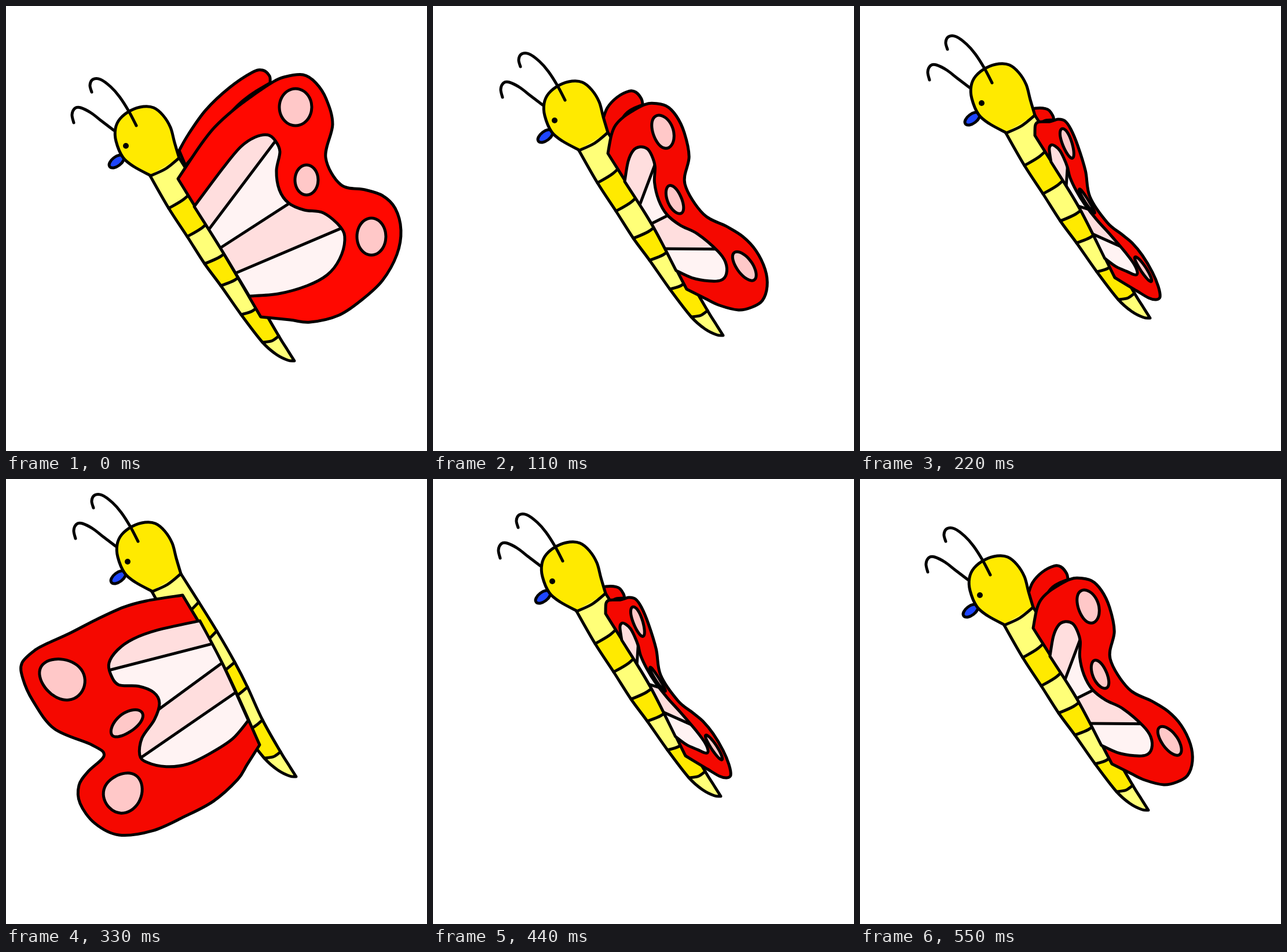
Write an HTML page with a canvas that moves like this. It is 727x770 px and loops after 0.66 s.

```html
<!DOCTYPE html>
<html lang="en">
<head>
<meta charset="utf-8">
<title>Butterfly</title>
<style>
  html, body { margin: 0; width: 100%; height: 100%; overflow: hidden; background: #fff; }
  canvas { display: block; }
</style>
</head>
<body>
<canvas id="stage" width="727" height="770"></canvas>
<script>
const ctx = document.getElementById('stage').getContext('2d');
const YELLOW = '#ffea00', LEMON = '#ffff78', PINK = '#ffdede', PALE = '#fff3f3', ROSE = '#ffc8c8', BLUE = '#1e46ff';
const STEP = 110;

// "x y x y | x y" becomes runs of points; "|" marks a corner.
const points = text => {
  const n = text.trim().split(/\s+/).map(Number);
  return n.flatMap((v, i) => i % 2 ? [] : [[v, n[i + 1]]]);
};
const runs = text => text.split('|').map(points);

// The body keeps one shape and only moves; each ring runs from its left to its right edge.
const head = runs('252 249 224 234 205 218 193 190 192 168 200 151 218 137 240 130 258 132 274 145 287 166 294 192 302 219');
const rings = ['252 250 302 219', '284 306 333 268', '316 355 364 318', '346 402 395 372',
  '374 440 417 415', '409 490 443 472', '446 538 474 527'].map(points);
const body = [
  [...rings.map(r => r[0]), [470, 559], [490, 569], [501, 570]],
  [[489, 551], ...rings.map(r => r[1]).reverse()]
];
const feelers = ['151 105 148 93 153 83 166 83 184 96 199 113 215 138 228 163',
  '120 158 117 144 122 133 132 132 150 141 168 155 189 171'].map(runs);

// The open wing; the pins of each pose bend it into shape.
const wing = runs('297 299 335 242 360 210 395 178 430 152 460 132 480 123 513 119 535 133 553 161 564 205 552 262 578 309 620 318 650 328 672 350 682 388 675 430 650 475 615 508 575 535 525 547 490 543 440 538 | 371 420 297 299');
const backWing = runs('299 250 315 222 345 180 385 142 425 115 443 111 455 121 456 133 | 400 172 310 276');
const cell = runs('325 347 375 280 405 244 430 227 452 223 465 233 473 252 467 285 472 318 488 341 515 353 548 358 578 383 585 405 576 438 555 465 520 484 470 498 420 502 | 371 420 325 347');
const veins = ['315 345 400 200', '350 387 465 234', '371 418 490 341', '397 462 578 385'].map(points);
const spots = [[500, 175, 28, 32], [519, 301, 20, 26], [631, 399, 25, 32]];

// Pins: root (3), tip, notch, lower lobe (2), hem, cell (3), back tip.
const pins = [
  '297 299 371 420 440 538 535 133 552 262 650 328 675 430 525 547 452 223 488 341 585 405 443 111',
  '302 255 378 378 438 490 420 190 435 308 535 399 577 485 495 518 370 247 404 361 505 443 350 149',
  '302 224 378 348 440 470 364 213 397 330 470 410 515 485 478 493 345 250 388 343 474 448 327 181',
  '305 201 374 320 438 460 29 345 148 460 126 530 195 616 400 520 178 318 265 388 243 490 58 260'
].map(points);
const bodyShift = [[-3, 44], [0, 0], [0, -30], [0, -55]];

// pose, dx, dy
const cycle = [[0, 0, 0], [1, 0, 0], [2, 0, 0], [3, 0, 0], [2, -4, 9], [1, -3, 3]];

// Gauss-Jordan elimination on rows that end with the two right-hand sides.
function solve(m) {
  const n = m.length;
  for (let c = 0; c < n; c++) {
    let best = c;
    for (let r = c; r < n; r++) if (Math.abs(m[r][c]) > Math.abs(m[best][c])) best = r;
    [m[c], m[best]] = [m[best], m[c]];
    for (let r = 0; r < n; r++) {
      if (r === c) continue;
      const k = m[r][c] / m[c][c];
      for (let j = c; j < n + 2; j++) m[r][j] -= k * m[c][j];
    }
  }
  return m.map((row, i) => [row[n] / row[i], row[n + 1] / row[i]]);
}

// Thin-plate warp that carries each pin of "from" onto its partner in "to".
function makeWarp(from, to) {
  const basis = ([x, y]) => [
    ...from.map(([u, v]) => {
      const d = ((x - u) ** 2 + (y - v) ** 2) / 1e4;
      return d ? d * Math.log(d) : 0;
    }), 1, x / 100, y / 100];
  const rows = from.map((p, i) => [...basis(p), ...to[i]]);
  for (const f of [() => 1, p => p[0] / 100, p => p[1] / 100]) rows.push([...from.map(f), 0, 0, 0, 0, 0]);
  const w = solve(rows);
  return p => basis(p).reduce((s, b, i) => [s[0] + b * w[i][0], s[1] + b * w[i][1]], [0, 0]);
}

function curve(parts, closed) {
  const path = new Path2D();
  let last = null;
  for (const part of parts) {
    const p = last ? [last, ...part] : part;
    if (!last) path.moveTo(...p[0]);
    for (let i = 0; i < p.length - 1; i++) {
      const a = p[i - 1] || p[i], b = p[i], c = p[i + 1], d = p[i + 2] || c;
      path.bezierCurveTo(
        b[0] + (c[0] - a[0]) / 6, b[1] + (c[1] - a[1]) / 6,
        c[0] - (d[0] - b[0]) / 6, c[1] - (d[1] - b[1]) / 6, c[0], c[1]);
    }
    last = p[p.length - 1];
  }
  if (closed) path.closePath();
  return path;
}

function polygon(pts) {
  const path = new Path2D();
  pts.forEach(p => path.lineTo(...p));
  path.closePath();
  return path;
}

function oval(x, y, rx, ry, turn = 0) {
  const path = new Path2D();
  path.ellipse(x, y, rx, ry, turn, 0, Math.PI * 2);
  return path;
}

function fill(path, color) {
  ctx.fillStyle = color;
  ctx.fill(path);
}

function paint(path, color) {
  fill(path, color);
  ctx.stroke(path);
}

function within(path, draw) {
  ctx.save();
  ctx.clip(path);
  draw();
  ctx.restore();
}

// A ring sags a little towards the tail.
const sag = ([a, b]) => [a, [(a[0] + b[0]) / 2 + 2, (a[1] + b[1]) / 2 + 3], b];
const extend = ([a, b]) => [a, [b[0] + (b[0] - a[0]) * 0.4, b[1] + (b[1] - a[1]) * 0.4]];

const bodyPath = curve(body), headPath = curve(head);
const ringPaths = rings.map(r => curve([sag(r)]));
const feelerPaths = feelers.map(f => curve(f));
const tailEnd = rings[6].map(([x, y]) => [x + 60, y + 60]);

function makeWing(to) {
  const warp = makeWarp(pins[0], to);
  const bend = parts => curve(parts.map(p => p.map(warp)), true);
  const ring = ([x, y, rx, ry]) => Array.from({ length: 25 }, (_, i) => {
    const a = i / 12 * Math.PI;
    return [x + rx * Math.cos(a), y + ry * Math.sin(a)];
  });
  return {
    outline: bend(wing),
    back: to[3][0] > to[0][0] && bend(backWing),
    cell: bend(cell),
    veins: veins.map(v => extend(v).map(warp)),
    spots: spots.map(s => bend([ring(s)]))
  };
}
const wings = pins.map(makeWing);

function drawBody() {
  paint(oval(194, 225, 15, 8, -0.65), BLUE);
  paint(headPath, YELLOW);
  fill(bodyPath, YELLOW);
  within(bodyPath, () => {
    for (let i = 0; i < 7; i += 2) {
      fill(polygon([...sag(rings[i]), ...sag(rings[i + 1] || tailEnd).reverse()]), LEMON);
    }
  });
  ctx.stroke(bodyPath);
  ringPaths.forEach(r => ctx.stroke(r));
  fill(oval(210, 198, 5, 5), '#000');
  feelerPaths.forEach(f => ctx.stroke(f));
}

function drawWing(w, red) {
  paint(w.outline, red);
  fill(w.cell, PALE);
  within(w.cell, () => {
    for (const i of [0, 2]) fill(polygon([...w.veins[i], ...w.veins[i + 1].slice().reverse()]), PINK);
    w.veins.slice(1).forEach(v => ctx.stroke(polygon(v)));
  });
  ctx.stroke(w.cell);
  w.spots.forEach(s => paint(s, ROSE));
}

function frame(now) {
  const [pose, dx, dy] = cycle[Math.floor(now / STEP) % cycle.length];
  const w = wings[pose], red = pose ? '#f50800' : '#ff0800';
  ctx.setTransform(1, 0, 0, 1, 0, 0);
  ctx.fillStyle = '#fff';
  ctx.fillRect(0, 0, 727, 770);
  ctx.translate(dx, dy);
  ctx.lineWidth = 5;
  ctx.lineCap = ctx.lineJoin = 'round';
  ctx.strokeStyle = '#000';
  if (w.back) paint(w.back, red);
  ctx.save();
  ctx.translate(...bodyShift[pose]);
  drawBody();
  ctx.restore();
  drawWing(w, red);
}

const start = performance.now();
function tick() {
  frame(performance.now() - start);
  requestAnimationFrame(tick);
}
tick();
</script>
</body>
</html>
```
